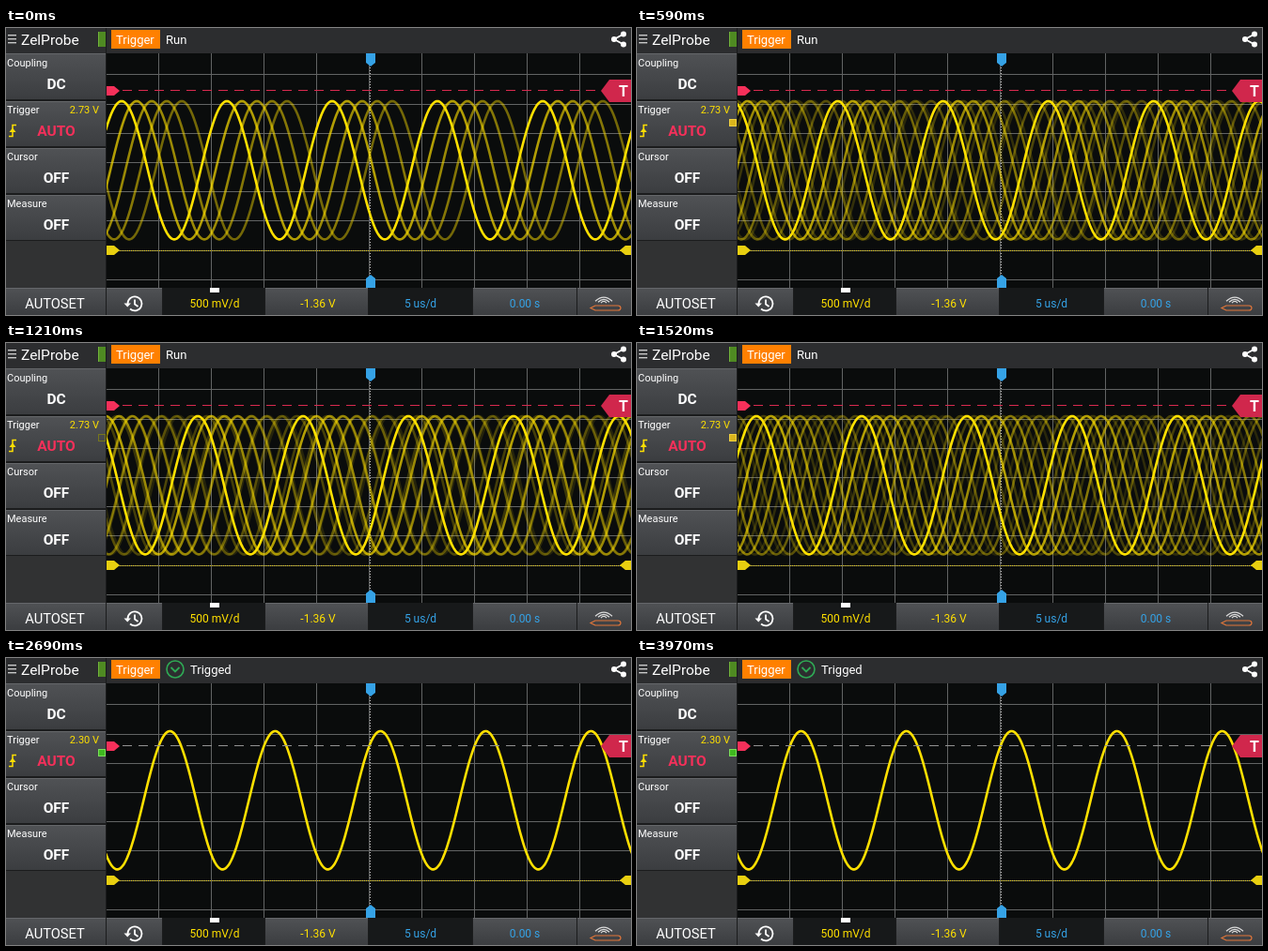
An HTML page with a canvas that plays this animation: 665 px wide and 306 px high, repeating every 4000 ms.

```html
<!DOCTYPE html>
<html lang="en">
<head>
<meta charset="utf-8">
<title>Oscilloscope</title>
<style>
html, body { margin: 0; width: 100%; height: 100%; overflow: hidden; background: #333; }
canvas { display: block; }
</style>
</head>
<body>
<canvas id="scope" width="665" height="306"></canvas>
<script>
const ctx = document.getElementById('scope').getContext('2d');
const LOOP = 4000, PERIOD = 112, CENTER_X = 387, MID_Y = 151.7, AMP = 73.7;
const GROUND_Y = 237, PX_PER_VOLT = 62.4;
const YELLOW = '#ffe000', BLUE = '#35a2e6', RED = '#f5305a';
const DRAG_START = 1900, DRAG_END = 2140, LOCKED = 2000, TRIGGED = 2420;

// Free-running sweep: [time, trace number, peak x]
const SWEEP = [[-280, 0, 187], [0, 4, 123], [340, 9, 38], [910, 16, -75],
  [1210, 20, -132], [1830, 30, -286], [2450, 40, -440]];

const clamp = v => Math.max(0, Math.min(1, v));

function lookup(from, to, v) {
  let i = 0;
  while (i < SWEEP.length - 2 && v >= SWEEP[i + 1][from]) i++;
  const a = SWEEP[i], b = SWEEP[i + 1];
  return a[to] + (b[to] - a[to]) * (v - a[from]) / (b[from] - a[from]);
}

function rect(x, y, w, h, fill) {
  ctx.fillStyle = fill;
  ctx.fillRect(x, y, w, h);
}

function text(str, x, y, size, fill = '#fff', align = 'left', weight = 400) {
  ctx.font = `${weight} ${size}px Roboto, sans-serif`;
  ctx.textAlign = align;
  ctx.fillStyle = fill;
  ctx.fillText(str, x, y);
}

function poly(fill, ...p) {
  ctx.beginPath();
  for (let i = 0; i < p.length; i += 2) ctx.lineTo(p[i], p[i + 1]);
  ctx.fillStyle = fill;
  ctx.fill();
}

function stroke(path, color, width = 1) {
  ctx.strokeStyle = color;
  ctx.lineWidth = width;
  ctx.stroke(new Path2D(path));
}

function disc(x, y, r, fill) {
  ctx.beginPath();
  ctx.arc(x, y, r, 0, 7);
  ctx.fillStyle = fill;
  ctx.fill();
}

function dashed(path, color, dash) {
  ctx.setLineDash(dash);
  stroke(path, color);
  ctx.setLineDash([]);
}

function button(x, y, w, h) {
  const g = ctx.createLinearGradient(0, y, 0, y + h);
  g.addColorStop(0, '#505255');
  g.addColorStop(1, '#3b3d40');
  rect(x, y, w, h, g);
  rect(x, y, w, 1, '#65676a');
}

function wave(peak, alpha) {
  ctx.beginPath();
  for (let x = 106; x <= 666; x++)
    ctx.lineTo(x, MID_Y - AMP * Math.cos((x - peak) * 2 * Math.PI / PERIOD));
  ctx.globalAlpha = alpha;
  ctx.strokeStyle = YELLOW;
  ctx.lineWidth = 2.6;
  ctx.stroke();
  ctx.globalAlpha = 1;
}

function drawTraces(t, levelY) {
  const now = lookup(0, 1, Math.min(t, LOCKED)) + 0.001;
  const ghost = t < LOCKED ? 1 : clamp(1 - (t - LOCKED) / 160);
  const newest = Math.floor(now);
  for (let n = Math.max(0, newest - 13); ghost && n <= newest; n++) {
    const fade = n === newest ? 1 : 0.8 * Math.exp((n - now) / 6.5);
    wave(lookup(1, 2, n), fade * ghost);
  }
  if (t >= LOCKED) {
    const offset = Math.acos(Math.min(1, (MID_Y - levelY) / AMP)) * PERIOD / (2 * Math.PI);
    const jitter = t < TRIGGED ? 0 : 0.5 * Math.sin(Math.floor(t / 30) * 2.4);
    wave(CENTER_X - 0.5 + offset + jitter, 1);
  }
}

function drawScreen(t, levelY) {
  rect(107, 27, 558, 250, '#0a0c0c');
  for (let x = 162; x < 665; x += 56) rect(x, 27, 1, 250, '#626464');
  for (let k = -1; k < 7; k++) rect(107, Math.round(236.6 - k * 31.2), 558, 1, '#626464');
  dashed('M387.5 27V277', '#d0d0d0', [1, 2]);
  dashed('M107 237.5H665', '#e8cf10', [1, 1]);

  ctx.save();
  ctx.beginPath();
  ctx.rect(107, 27, 558, 250);
  ctx.clip();
  drawTraces(t, levelY);
  ctx.restore();

  const y = Math.round(levelY);
  dashed(`M124 ${y - 0.5}H634`, t < LOCKED ? '#d92a50' : '#929292', [10, 7]);
  poly(RED, 107, y - 5, 115, y - 5, 121, y, 115, y + 5, 107, y + 5);
  poly('#d0274c', 633, y, 642, y - 12, 665, y - 12, 665, y + 12, 642, y + 12);
  text('T', 657, y + 6, 16, '#fff', 'center', 700);

  poly('#e8cf10', 107, 232, 115, 232, 121, 237, 115, 242, 107, 242);
  poly('#e8cf10', 653, 237, 659, 232, 665, 232, 665, 242, 659, 242);
  poly(BLUE, 383, 27, 393, 27, 393, 37, 388, 41, 383, 37);
  poly(BLUE, 383, 277, 393, 277, 393, 267, 388, 263, 383, 267);
}

function drawHeader(t) {
  rect(0, 0, 665, 27, '#2c2d2f');
  for (const y of [7, 11, 15]) rect(2, y, 9, 1.4, '#c8c8c8');
  text('ZelProbe', 16, 18, 15.5);
  rect(98, 4, 8, 16, '#4f8a22');
  rect(98, 4, 1, 16, '#72b53a');
  rect(106, 0, 1, 277, '#1a1b1c');
  rect(112, 2, 52, 20, '#ff8000');
  text('Trigger', 117, 17, 13);
  if (t < TRIGGED) {
    text('Run', 170, 17, 13);
  } else {
    stroke('M189 12a9 9 0 1 0-18 0a9 9 0 1 0 18 0', '#2faa55', 1.6);
    stroke('M175.5 10l4.5 4.5 4.5-4.5', '#2faa55', 1.8);
    text('Trigged', 196, 17, 13);
  }
  stroke('M657 6.5L647 12L657 17.5', '#fff', 1.8);
  for (const [x, y] of [[657, 6.5], [647, 12], [657, 17.5]]) disc(x, y, 3, '#fff');
}

function drawLed(t) {
  const box = [98.5, 97.5, 7, 7];
  if (t >= TRIGGED) {
    rect(...box, '#3fb81f');
    ctx.strokeStyle = '#7be05a';
  } else if ((t > 480 && t < 1150) || t > 1480) {
    rect(...box, '#d9b51c');
    ctx.strokeStyle = '#f0d040';
  } else if (t >= 1150 && t < 1260) {
    ctx.strokeStyle = '#77771c';
  } else {
    return;
  }
  ctx.lineWidth = 1;
  ctx.strokeRect(...box);
}

function drawSidebar(t, volts) {
  rect(0, 27, 106, 250, '#313233');
  const items = [['Coupling', 'DC'], ['Trigger', 'AUTO'], ['Cursor', 'OFF'], ['Measure', 'OFF']];
  items.forEach(([label, value], i) => {
    const y = 27 + i * 50;
    rect(0, y, 106, 50, '#1b1c1d');
    button(0, y + (i ? 1 : 0), 106, i ? 48 : 49);
    text(label, 1, y + 14, 11);
    text(value, 53.5, y + 38, 15.5, i === 1 ? RED : '#fff', 'center', 700);
  });
  text(volts.toFixed(2) + ' V', 99, 91, 11, YELLOW, 'right');
  stroke('M3 115.5H7V103.5H11', YELLOW, 1.5);
  poly(YELLOW, 3.5, 111, 7, 106.5, 10.5, 111);
  drawLed(t);
}

function drawFooter() {
  rect(0, 277, 665, 29, '#1b1c1d');
  button(0, 277, 106, 29);
  text('AUTOSET', 52, 299, 14.7, '#fff', 'center');
  button(107, 277, 59, 29);
  button(276, 277, 109, 29);
  button(497, 277, 110, 29);
  button(608, 277, 57, 29);
  rect(167, 277, 108, 29, '#17191a');
  rect(386, 277, 110, 29, '#17191a');
  rect(217, 277, 10, 5, '#fff');
  text('500 mV/d', 222, 298, 12, YELLOW, 'center');
  text('-1.36 V', 332, 298, 12, YELLOW, 'center');
  text('5 us/d', 441, 298, 12, BLUE, 'center');
  text('0.00 s', 552, 298, 12, BLUE, 'center');

  // History clock
  stroke('M129.5 294a7.5 7.5 0 1 1 2.5 5.5M137 289.5V294.5L140.5 297', '#fff', 1.8);
  poly('#fff', 125.5, 293.5, 133, 293.5, 129.2, 297.5);

  // Wireless probe
  stroke('M622 298.5L627 296H651Q654 296 654 298.5T651 301H627Z', '#e2763a', 1.2);
  for (const r of [3, 6, 9])
    stroke(`M${636 - r} ${294 - r * 0.3}Q636 ${293 - r * 1.1} ${636 + r} ${294 - r * 0.3}`, '#ddd', 1.2);
}

function frame(ms) {
  const t = ms % LOOP;
  const volts = 2.73 - 0.43 * clamp((t - DRAG_START) / (DRAG_END - DRAG_START));
  const levelY = GROUND_Y - volts * PX_PER_VOLT + 0.4;
  drawScreen(t, levelY);
  drawHeader(t);
  drawSidebar(t, volts);
  drawFooter();
}

let start;
function tick(now) {
  start ??= now;
  frame(now - start);
  requestAnimationFrame(tick);
}
frame(0);
requestAnimationFrame(tick);
</script>
</body>
</html>
```
